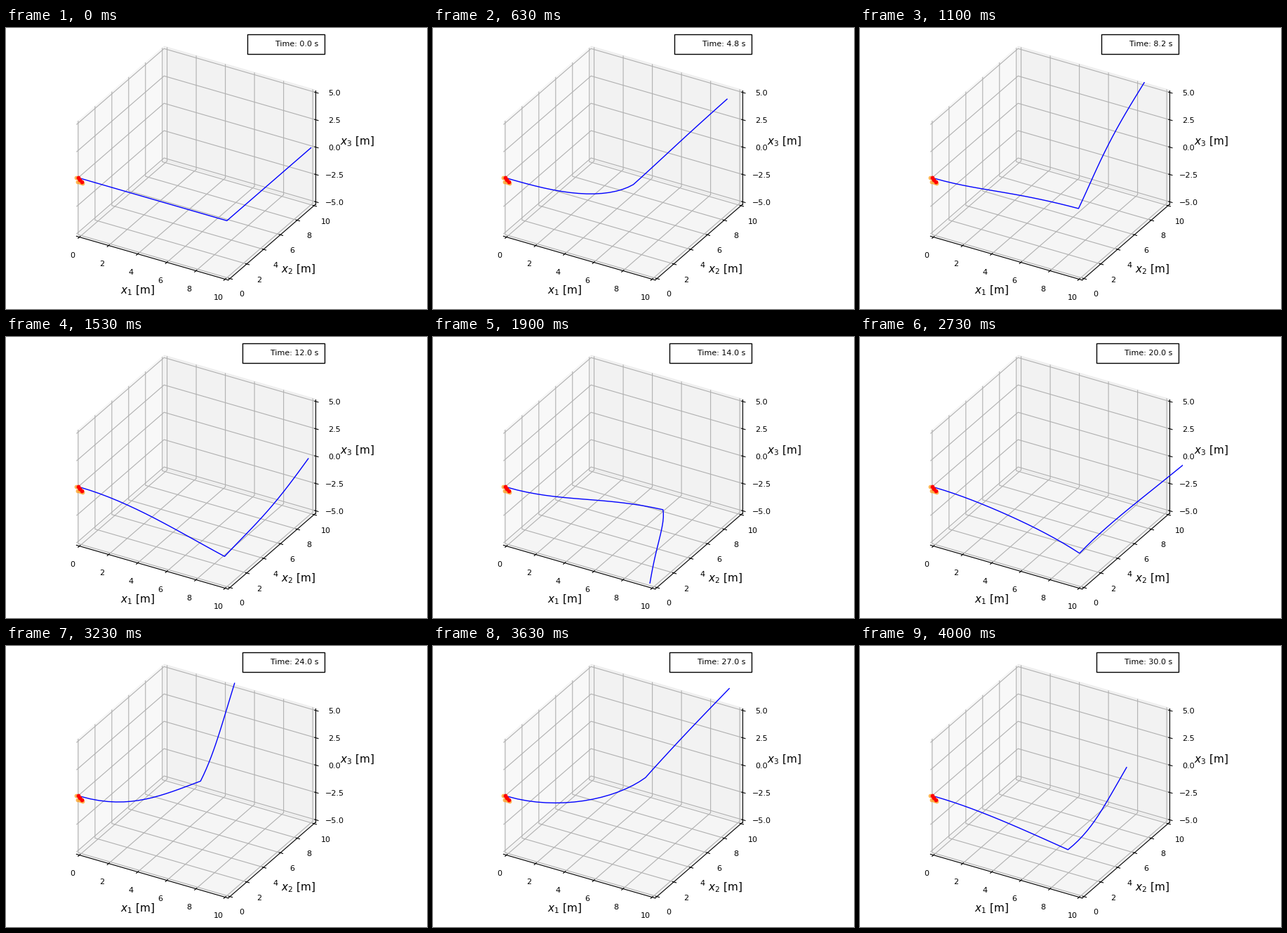
Write a matplotlib script that moves like this. It is 600 px wide and 400 px high and loops after 4030 ms.

```python
import numpy as np
import matplotlib.pyplot as plt
from matplotlib.animation import FuncAnimation

# Right-angle cantilever, kicked out of plane at its elbow
LEG = 10.0
N = 16                  # elements per leg
H = LEG / N
EI = 1e3                # bending and torsion
EA = 4e4                # axial and shear, practically rigid
SHAPES = 121            # computed poses, shown at 30 per second
POSE_DT = 0.25
SUBSTEPS = 100
POSE_MS = 100 / 3
FRAMES, INTERVAL = 130, 31

P, Q = [1, 2, 0], [2, 0, 1]


def cross(a, b):
    return a[P] * b[Q] - a[Q] * b[P]


def load(t):
    return 50 * max(0.0, 1 - abs(t - 1))


def simulate():
    """Explicit integration of a shear-flexible beam; node positions per pose."""
    n = 2 * N + 1
    s = np.arange(n)
    r = H * np.array([np.minimum(s, N), np.maximum(s - N, 0), 0 * s], float)
    d = np.diff(r) / H
    R = np.repeat(np.eye(3)[:, :, None], n, axis=2)   # component, director, node

    mass = np.full(n, H)
    mass[-1] /= 2
    J = np.tile(10 * mass, (3, 1))
    J[0, :N] *= 2
    J[1, N + 1:] *= 2
    J[:2, N] *= 1.5

    v, w = np.zeros((3, n)), np.zeros((3, n))
    dt = POSE_DT / SUBSTEPS
    shapes = [r.copy()]
    for step in range((SHAPES - 1) * SUBSTEPS):
        A, B = R[:, :, :-1], R[:, :, 1:]
        dr = r[:, 1:] - r[:, :-1]
        strain = ((A + B) * dr[:, None]).sum(0) / (2 * H) - d
        fa = EA * (A * strain).sum(1)
        fb = EA * (B * strain).sum(1)
        f = (fa + fb) / 2
        m = cross(A, B).sum(1) / 2
        m *= EI / H * (1 + (m * m).sum(0) / 6)

        force, torque = np.zeros((3, n)), np.zeros((3, n))
        force[:, :-1] += f
        force[:, 1:] -= f
        force[2, N] += load(step * dt)
        torque[:, :-1] += cross(dr, fa) / 2 + m
        torque[:, 1:] += cross(dr, fb) / 2 - m
        torque = (R * torque[:, None]).sum(0)

        v += dt * force / mass
        v[:, 0] = 0
        guess = w + dt * (torque - cross(w, J * w)) / J
        mid = (w + guess) / 2
        w += dt * (torque - cross(mid, J * mid)) / J
        w[:, 0] = 0

        r += dt * v
        a = dt / 2 * (R * w).sum(1)
        axis = a[:, None]
        spin = cross(axis, R)
        R = R + 2 / (1 + (a * a).sum(0)) * (spin + cross(axis, spin))

        if (step + 1) % SUBSTEPS == 0:
            shapes.append(r.copy())
    return shapes


def time_label(t):
    return f"Time: {float(f'{t:.2g}')} s"


shapes = simulate()

fig = plt.figure(figsize=(6, 4), dpi=100)
left, top, size = 71.7, 3.7, 388
ax = fig.add_axes([left / 600, 1 - (top + size) / 400, size / 600, size / 400],
                  projection="3d", proj_type="ortho")

line, = ax.plot(*shapes[0], color="blue", lw=1)
dots = dict(ls="none", marker="o", ms=4.2, mew=0)
ax.plot([-0.36, -0.23, -0.08, 0.07], [0] * 4, [-0.02, -0.38, -0.37, -0.38],
        color="#ff9f1c", alpha=0.75, **dots)
ax.plot([-0.22, -0.10, 0.05], [0] * 3, [-0.01, -0.12, -0.26],
        color="red", **dots)

pad = LEG / 48
ax.set_xlim(-pad, LEG + pad)
ax.set_ylim(-pad, LEG + pad)
ax.set_zlim(-LEG / 2 - pad, LEG / 2 + pad)
ax.set_xticks(range(0, 11, 2))
ax.set_yticks(range(0, 11, 2))
ax.set_zticks(np.linspace(-5, 5, 5))
ax.tick_params(labelsize=8)
for i, axis in enumerate((ax.xaxis, ax.yaxis, ax.zaxis), 1):
    axis.set_rotate_label(False)
    axis.set_label_text(f"$x_{i}$ [m]", fontsize=11)

legend = ax.legend([plt.Line2D([], [], ls="none")], [time_label(0)],
                   loc="upper right", fontsize=8, borderpad=0.8,
                   borderaxespad=0.5, fancybox=False, framealpha=1,
                   edgecolor="black")
clock = legend.get_texts()[0]


def update(i):
    # pose at the middle of the display interval
    k = min(int((i + 0.5) * INTERVAL / POSE_MS), SHAPES - 1)
    line.set_data_3d(*shapes[k])
    clock.set_text(time_label(k * POSE_DT))
    return line, clock


anim = FuncAnimation(fig, update, frames=FRAMES, interval=INTERVAL,
                     repeat=True, repeat_delay=0, blit=False)
plt.show()
```
